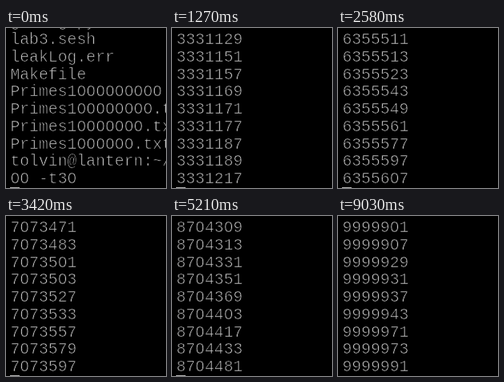
Animation, 200 px wide and 200 px high, one loop 10000 ms. Source, as an HTML page with a canvas:

```html
<!DOCTYPE html>
<html lang="en">
<head>
<meta charset="utf-8">
<title>Prime search</title>
<style>
  html, body { margin: 0; width: 100%; height: 100%; overflow: hidden; background: #000; }
  canvas { display: block; width: 200px; height: 200px; }
</style>
</head>
<body>
<canvas id="screen" width="200" height="200"></canvas>
<script>
const ctx = document.getElementById('screen').getContext('2d');
const LOOP = 10000, FPS = 30, ROWS = 9;
const LEFT = 5.4, ADVANCE = 11.86, BASELINE = 20, PITCH = 21.78;

const shell = [
  'lab3.sesh', 'leakLog.err', 'Makefile',
  'Primes1000000000', 'Primes100000000.txt', 'Primes10000000.txt', 'Primes1000000.txt',
  'tolvin@lantern:~/', '00 -t30'
];

// Progress of the search: [tick, largest prime printed]
const progress = [[0, 0], [38, 3331217], [77, 6355607], [127, 7791697], [156, 8704481], [188, 9999991]];
const lastTick = 188;

function reached(tick) {
  const i = progress.findIndex(([end]) => tick <= end);
  const [t0, v0] = progress[i - 1], [t1, v1] = progress[i];
  return Math.round(v0 + (v1 - v0) * (tick - t0) / (t1 - t0));
}

function isPrime(n) {
  if (n % 2 === 0) return n === 2;
  for (let d = 3; d * d <= n; d += 2) if (n % d === 0) return false;
  return n > 1;
}

function primesUpTo(n) {
  const found = [];
  for (; found.length < ROWS; n--) if (isPrime(n)) found.unshift(String(n));
  return found;
}

function drawLine(text, row) {
  const y = BASELINE + row * PITCH;
  [...text].forEach((ch, i) => {
    const x = LEFT + i * ADVANCE;
    ctx.fillStyle = '#c0c0c0';
    ctx.fillText(ch, x, y);
    ctx.strokeText(ch, x, y); // thins the glyph
    if (ch === '0') {         // plain zero, without its dot
      ctx.fillStyle = '#000';
      ctx.fillRect(x + ADVANCE / 2 - 1.8, y - 9, 3.6, 5);
    }
  });
}

function draw(tick) {
  ctx.fillStyle = '#000';
  ctx.fillRect(0, 0, 200, 200);
  ctx.font = `${ADVANCE / 0.6}px "Liberation Mono", "Courier New", monospace`;
  ctx.strokeStyle = '#000';
  ctx.lineWidth = 0.65;
  ctx.lineJoin = 'round';
  if (tick === 0) drawLine('gcdLog.py', -1);
  (tick === 0 ? shell : primesUpTo(reached(tick))).forEach(drawLine);
  if (tick < lastTick) {
    ctx.fillStyle = '#b4b4b4';
    ctx.fillRect(5, 199, 12, 1);
  }
}

let shown = -1;
function frame() {
  const t = performance.now() % LOOP;
  const tick = Math.min(lastTick, Math.floor(t * FPS / 1000 + 0.1));
  if (tick !== shown) draw(shown = tick);
  requestAnimationFrame(frame);
}
frame();
</script>
</body>
</html>
```
